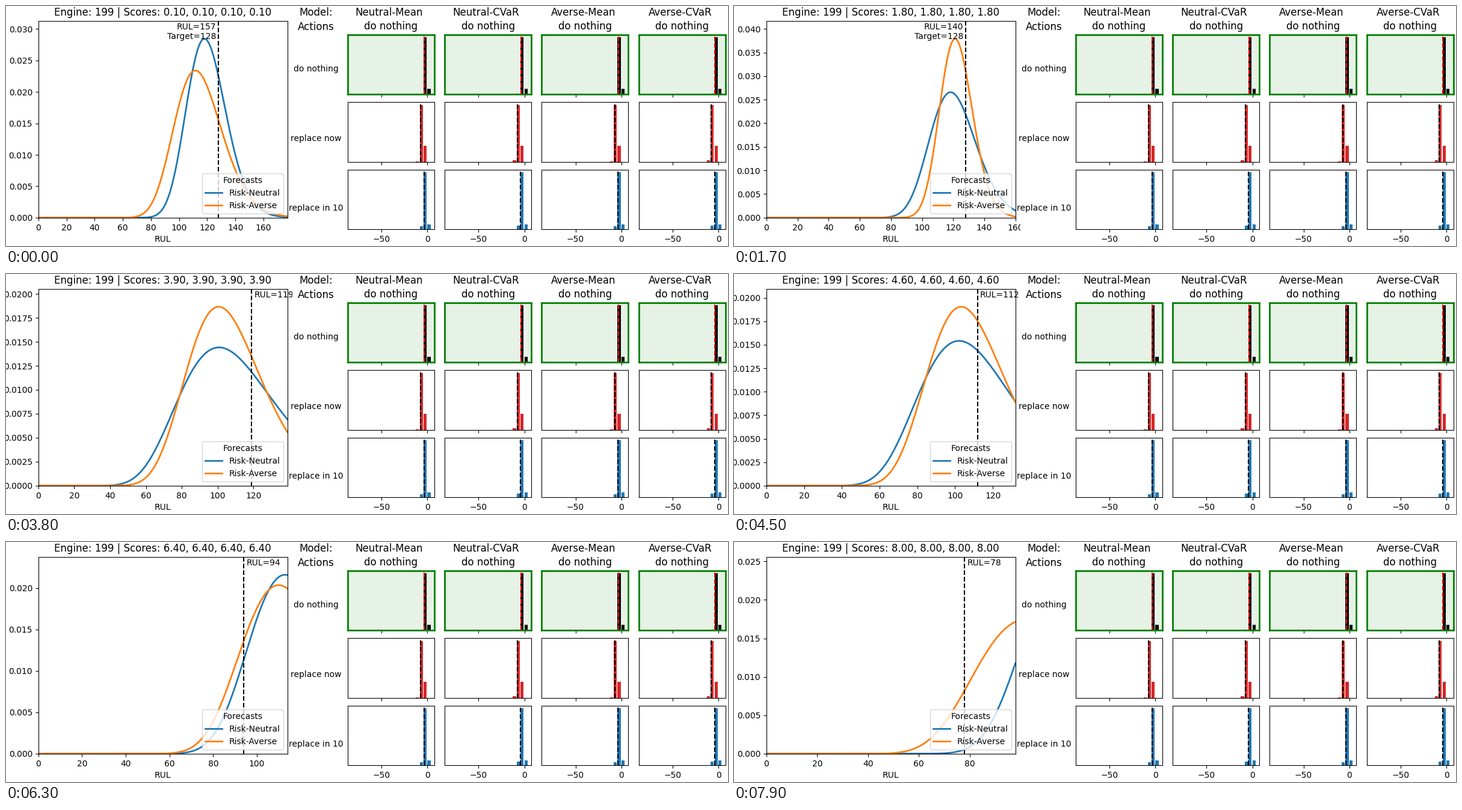
A matplotlib script for the animation above (8000 ms loop, 1200 by 400 pixels).

```python
import numpy as np
import matplotlib.pyplot as plt
from matplotlib.animation import FuncAnimation
from matplotlib.patches import Rectangle

W, H, DPI = 1200, 400, 100
FRAMES, INTERVAL = 80, 100
START_RUL, TARGET, MARGIN = 157, 128, 20

# Log-normal forecasts: key points {step: value} for the mode and the width
FORECASTS = {
    "Risk-Neutral": ("tab:blue",
                     {0: 118, 26: 118.5, 38: 100.8, 53: 103.6, 63: 112.9, 79: 116.2},
                     {0: .118, 26: .130, 38: .265, 53: .224, 63: .1615, 79: .146}),
    "Risk-Averse": ("tab:orange",
                    {0: 111.6, 8: 120.6, 26: 121.8, 38: 100.6, 63: 110, 79: 102},
                    {0: .151, 8: .082, 26: .091, 38: .208, 63: .1755, 79: .219}),
}

MODELS = ["Neutral-Mean", "Neutral-CVaR", "Averse-Mean", "Averse-CVaR"]
# label, bar colour, line colour, tallest bin, side bar heights, mean risk
ACTIONS = [
    ("do nothing", "black", "red", -2.5, (0, .092), -3.45),
    ("replace now", "tab:red", "black", -6.7, (.01, .265), -7.35),
    ("replace in 10", "tab:blue", "black", -2.5, (.052, .085), -3.8),
]
BIN, PEAK = 4.2, 1 / 1.05
TAIL_RISK, TAIL_BAR = .45, .015

fig = plt.figure(figsize=(W / DPI, H / DPI), dpi=DPI, facecolor="white")


def add_axes(left, top, width, height, **kw):
    """Axes placed in pixels, measured from the top left corner."""
    return fig.add_axes([left / W, 1 - (top + height) / H,
                         width / W, height / H], **kw)


def add_text(x, y, text, size=12, va="baseline"):
    fig.text(x / W, 1 - y / H, text, size=size, ha="center", va=va, zorder=6)


def add_panel(left, right, zorder):
    fig.add_artist(Rectangle((left / W, 0), (right - left) / W, 1,
                             transform=fig.transFigure, fc="white", ec="none",
                             zorder=zorder))


def interpolate(points, i):
    return np.interp(i, list(points), list(points.values()))


def peak(mode, width):
    return np.exp(-width**2 / 2) / (mode * width * np.sqrt(2 * np.pi))


def density(x, mode, width):
    return peak(mode, width) * np.exp(-(np.log(x / mode) / width)**2 / 2)


def draw_histogram(col, row):
    _, color, line_color, centre, (left, right), risk = ACTIONS[row]
    if MODELS[col].endswith("CVaR"):
        left, risk = left + TAIL_BAR, risk - TAIL_RISK
    ax = add_axes(567.8 + 161.25 * col, 47.7 + 112.5 * row, 144.1, 99.6,
                  zorder=5)
    ax.bar([centre - BIN, centre, centre + BIN], [left, PEAK, right],
           width=.8 * BIN, color=color)
    ax.axvline(risk, color=line_color, ls="--")
    ax.set(xlim=(-86.8, 7.55), ylim=(0, 1), xticks=[-50, 0], yticks=[])
    ax.tick_params(labelbottom=row == len(ACTIONS) - 1)
    if row == 0:
        ax.set_title("do nothing")
        ax.set_facecolor(("green", .1))
        for spine in ax.spines.values():
            spine.set(color="green", linewidth=2)


# Action labels sit on their own panel, partly covered by the histograms' panel
add_panel(476, 559.5, 2)
for row, (label, *_) in enumerate(ACTIONS):
    fig.text(515.3 / W, 1 - (104.5 + 116 * row) / H, label, size=10,
             ha="center", va="center", zorder=3)
add_panel(559.5, W, 4)
add_text(515.5, 16.5, "Model:")
add_text(515.5, 40, "Actions")
for col, model in enumerate(MODELS):
    add_text(636.8 + 161.25 * col, 16.5, model)
    for row in range(len(ACTIONS)):
        draw_histogram(col, row)

main = add_axes(53.8, 24.8, 414, 328, zorder=1)
main.set_xlabel("RUL")
title = main.set_title("")
curves = {name: main.plot([], [], color=color, lw=2, label=name)[0]
          for name, (color, *_) in FORECASTS.items()}
marker = main.axvline(0, color="black", ls="--")
note = main.annotate("", (0, .99), xycoords=("data", "axes fraction"),
                     xytext=(0, 0), textcoords="offset points", va="top")
main.legend(title="Forecasts", loc="lower right")


def update(i):
    rul = START_RUL - i
    x = np.linspace(.01, rul + MARGIN, 400)
    top = 0
    for name, (_, modes, widths) in FORECASTS.items():
        shape = interpolate(modes, i), interpolate(widths, i)
        curves[name].set_data(x, density(x, *shape))
        top = max(top, peak(*shape))
    main.set(xlim=(0, rul + MARGIN), ylim=(0, 1.1 * top))

    target = min(rul, TARGET)
    capped = rul > TARGET
    marker.set_xdata([target, target])
    note.xy = (target, .99)
    note.set_position((-2.9 if capped else 2.9, 0))
    note.set_ha("right" if capped else "left")
    note.set_text(f"RUL={rul}" + (f"\nTarget={TARGET}" if capped else ""))

    score = f"{(i + 1) / 10:.2f}"
    title.set_text("Engine: 199 | Scores: " + ", ".join([score] * len(MODELS)))


anim = FuncAnimation(fig, update, frames=FRAMES, interval=INTERVAL,
                     init_func=lambda: update(0), repeat=True)
plt.show()
```
